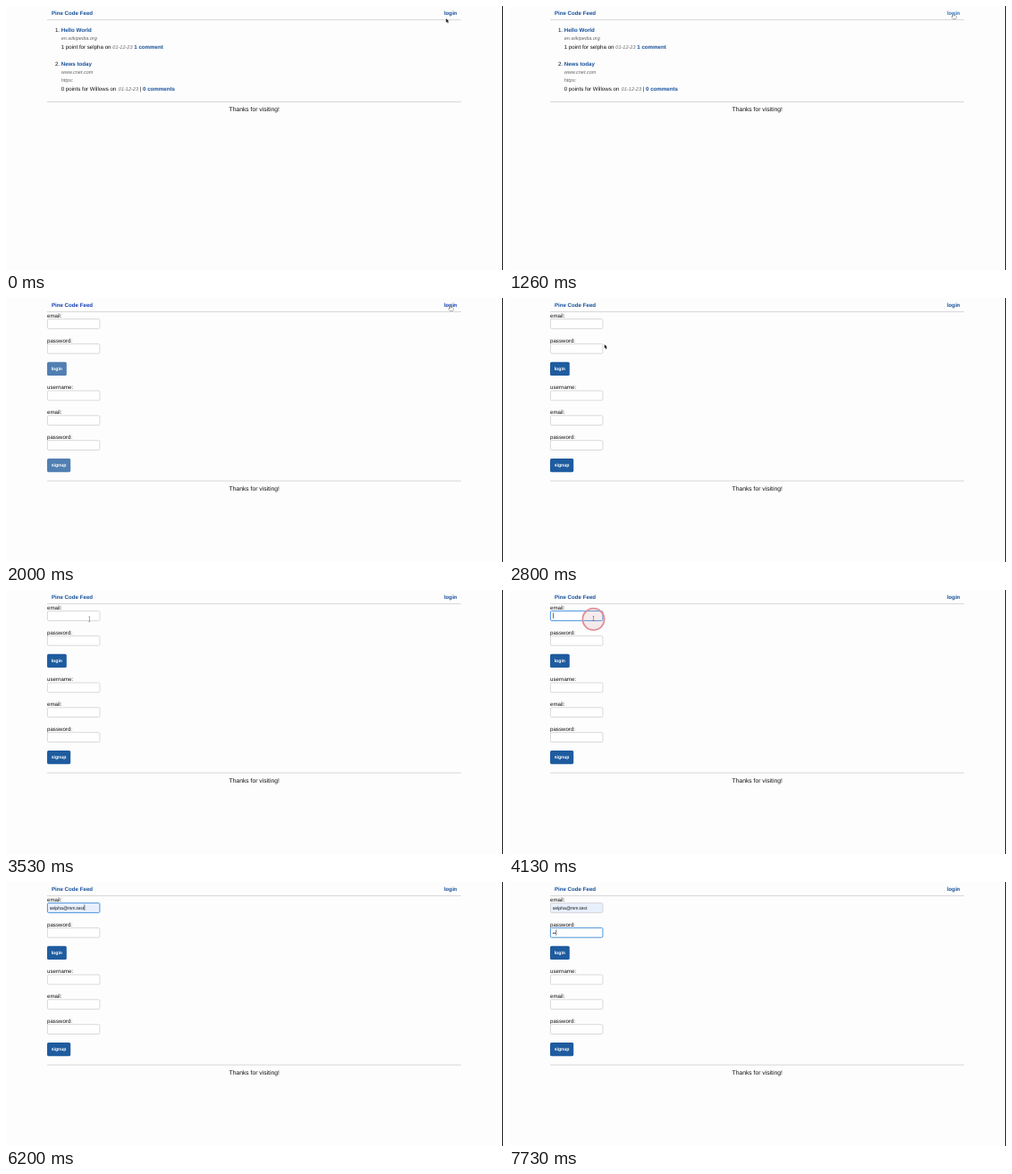
An HTML page with a canvas that plays this animation: 556x296 px, repeating every 8 s.

```html
<!DOCTYPE html>
<html lang="en">
<head>
<meta charset="utf-8">
<title>Pine Code Feed</title>
<style>
html, body { margin: 0; width: 100%; height: 100%; overflow: hidden; background: #fdfdfd; }
canvas { display: block; width: 556px; height: 296px; }
</style>
</head>
<body>
<canvas id="stage"></canvas>
<script>
const W = 556, H = 296, LOOP = 8000, TICK = 1000 / 15;
const REM = 6.17, SMALL = 5.56, CONTROL = 5.14;
const LINK = [22, 80, 155], LINK_HOVER = [52, 122, 190], LINK_RAW = [0, 0, 238];
const BUTTON = [31, 92, 159], BUTTON_RAW = [239, 239, 239];
const INK = '#111', GREY = '#666', LINE = '#d2d2d2';
const USER = 'selpha', EMAIL = 'selpha@mm.test';

const canvas = document.getElementById('stage');
const ctx = canvas.getContext('2d');
const dpr = window.devicePixelRatio || 1;
canvas.width = W * dpr;
canvas.height = H * dpr;

const clamp = v => Math.max(0, Math.min(1, v));
const mix = (a, b, p) => `rgb(${a.map((v, i) => Math.round(v + (b[i] - v) * p))})`;
const within = (t, a, b) => t >= a && t < b;

function text(str, x, y, { size = REM, color = INK, style = '', align = 'left' } = {}) {
  ctx.font = `${style} ${size}px "Liberation Sans", Helvetica, Arial, sans-serif`;
  ctx.textRendering = 'geometricPrecision';
  ctx.textAlign = align;
  ctx.fillStyle = color;
  ctx.fillText(str, x, y);
}

const bold = (str, x, y, color, size = REM) => text(str, x, y, { size, color, style: 'bold' });
const meta = (str, x, y) => text(str, x, y, { size: SMALL, color: GREY, style: 'italic' });

function rule(y) {
  ctx.fillStyle = LINE;
  ctx.fillRect(46, y, 463, 0.9);
}

function box(x, y, w, h, r, fill, stroke, width = 0.7) {
  ctx.beginPath();
  ctx.roundRect(x, y, w, h, r);
  ctx.fillStyle = fill;
  ctx.fill();
  if (!stroke) return;
  ctx.strokeStyle = stroke;
  ctx.lineWidth = width;
  ctx.stroke();
}

function footer(y) {
  rule(y);
  text('Thanks for visiting!', 277.7, y + 11.1, { size: REM * 1.1, align: 'center' });
}

function header(link, login) {
  bold('Pine Code Feed', 50.9, 9.9, link);
  bold('login', 489.9, 9.9, login);
  rule(14.9);
}

function newsPage(t) {
  const link = mix(LINK, LINK, 1);
  header(link, t >= 1260 ? mix(LINK_HOVER, LINK, 0) : link);

  text('1.', 54.9, 29);
  bold('Hello World', 61.7, 29, link);
  meta('en.wikipedia.org', 61.7, 38.3);
  text(`1 point for ${USER} on`, 61.7, 47.7);
  meta('01-12-23', 119.3, 47.7);
  bold('1 comment', 143.3, 47.7, link);

  text('2.', 54.9, 66.5);
  bold('News today', 61.7, 66.5, link);
  meta('www.cnet.com', 61.7, 75.8);
  meta('https:', 61.7, 85.4);
  text('0 points for Willows on', 61.7, 95);
  meta('01-12-23', 125.8, 95);
  text('|', 149.8, 95);
  bold('0 comments', 153, 95, link);

  footer(107);
}

function field(label, y, state = {}) {
  text(label, 46, y - 1.6);
  const border = state.focus ? '#4c93dc' : '#c9c9c9';
  box(46.4, y + 0.3, 58.5, 10.8, 1.3, state.fill || '#fff', border, state.focus ? 1 : 0.7);
  if (state.value) text(state.value, 48.8, y + 7.4, { size: CONTROL });
  if (state.caret) {
    ctx.fillStyle = INK;
    ctx.fillRect(state.caret, y + 2.2, 0.6, 6.4);
  }
}

function button(label, y, w, color) {
  box(46, y, w, 15.2, 1.6, color);
  bold(label, 50.7, y + 9.2, '#fff', CONTROL);
}

function emailState(t) {
  const filled = t >= 5590, typed = t >= 5460;
  const focus = within(t, 4100, 6800);
  const lit = within(t, 4100, 4660) || within(t, 5200, 5650) || within(t, 6200, 6660);
  return {
    focus,
    fill: filled ? '#e8f0fe' : '#fff',
    value: filled ? EMAIL : typed ? EMAIL[0] : '',
    caret: focus && lit && (filled ? 87.6 : typed ? 51.5 : 49)
  };
}

function passwordState(t) {
  const dots = t >= 7730 ? 2 : t >= 7460 ? 1 : 0;
  return {
    focus: t >= 6800,
    value: '•'.repeat(dots),
    caret: t >= 6800 && !within(t, 7330, 7460) && 49 + dots * 1.8
  };
}

function formPage(t) {
  const p = 1 - 0.24 * (1 - clamp((t - 2000) / 260));
  const link = mix(LINK_RAW, LINK, p);
  const fill = mix(BUTTON_RAW, BUTTON, p);
  header(link, link);
  field('email:', 23.3, emailState(t));
  field('password:', 51.1, passwordState(t));
  button('login', 71.8, 21.8, fill);
  field('username:', 103.7);
  field('email:', 131.5);
  field('password:', 159.4);
  button('signup', 180, 26.2, fill);
  footer(204.6);
}

// Pointer stops: time, x, y
const PATH = [
  [0, 492.3, 13.9], [1259, 492.3, 13.9], [1260, 497.4, 8.8], [2010, 497.4, 8.8],
  [2266, 194, 72], [2400, 194, 72], [2533, 117, 60.3], [2733, 117, 60.3],
  [2800, 106.8, 52], [3200, 92.6, 33], [3400, 92.6, 33], [3800, 94.4, 32]
];

function pointerAt(t) {
  const i = PATH.findIndex(k => k[0] > t);
  if (i < 0) return PATH[PATH.length - 1].slice(1);
  const a = PATH[i - 1], b = PATH[i];
  const p = (t - a[0]) / (b[0] - a[0]);
  return [a[1] + (b[1] - a[1]) * p, a[2] + (b[2] - a[2]) * p];
}

function shape(x, y, points, fill, stroke, width) {
  ctx.beginPath();
  for (let i = 0; i < points.length; i += 2) ctx.lineTo(x + points[i], y + points[i + 1]);
  ctx.closePath();
  ctx.lineJoin = 'round';
  ctx.strokeStyle = stroke;
  ctx.lineWidth = width;
  ctx.stroke();
  ctx.fillStyle = fill;
  ctx.fill();
}

function arrow(x, y) {
  shape(x, y, [0, 0, 0, 4.5, 1, 3.6, 1.8, 5.4, 2.6, 5, 1.8, 3.3, 3.2, 3.3], '#111', '#fff', 0.7);
}

function hand(x, y) {
  shape(x, y, [-0.6, 0, 0.2, 0, 0.4, 2, 2.5, 2.5, 2.8, 3.2, 2.2, 5.6, -0.6, 5.6, -2.3, 3.2, -1.7, 2.7, -0.6, 3.5],
    '#fff', '#222', 0.7);
}

function beam(x, y) {
  ctx.fillStyle = '#555';
  ctx.fillRect(x - 0.25, y - 2.7, 0.5, 5.4);
  ctx.fillRect(x - 0.9, y - 2.9, 1.8, 0.4);
  ctx.fillRect(x - 0.9, y + 2.5, 1.8, 0.4);
}

function pointer(t) {
  if (t >= 6060) return;
  const [x, y] = pointerAt(t);
  const inField = x < 105 && (within(y, 23, 35) || within(y, 51, 63));
  if (within(t, 1260, 2050)) hand(x, y);
  else if (inField) beam(x, y);
  else arrow(x, y);
}

// Click ring: grows, holds, then fades while spreading a little
function ring(t, x, y, start, full, release, end) {
  if (!within(t, start, end)) return;
  const grow = clamp((t - start + TICK) / (full - start + TICK));
  const fade = clamp((t - release) / (end - release));
  ctx.globalAlpha = grow * (1 - fade);
  ctx.beginPath();
  ctx.arc(x, y, 6 + 6.1 * grow + fade, 0, Math.PI * 2);
  ctx.fillStyle = 'rgba(205, 150, 160, 0.18)';
  ctx.fill();
  ctx.strokeStyle = '#e08f97';
  ctx.lineWidth = 1.8;
  ctx.stroke();
  ctx.globalAlpha = 1;
}

function draw(now) {
  const t = Math.floor(((now % LOOP) + 7) / TICK) * TICK % LOOP;
  ctx.setTransform(dpr, 0, 0, dpr, 0, 0);
  ctx.fillStyle = '#fdfdfd';
  ctx.fillRect(0, 0, W, H);
  if (t < 2000) newsPage(t);
  else formPage(t);
  ctx.fillStyle = '#222';
  ctx.fillRect(555, 0, 1, H);
  ring(t, 498, 11.6, 1600, 1730, 1730, 1860);
  ring(t, 94.5, 32.8, 3930, 4066, 4200, 4460);
  pointer(t);
}

let origin;
function loop(now) {
  origin ??= now;
  draw(now - origin);
  requestAnimationFrame(loop);
}
draw(0);
requestAnimationFrame(loop);
</script>
</body>
</html>
```
